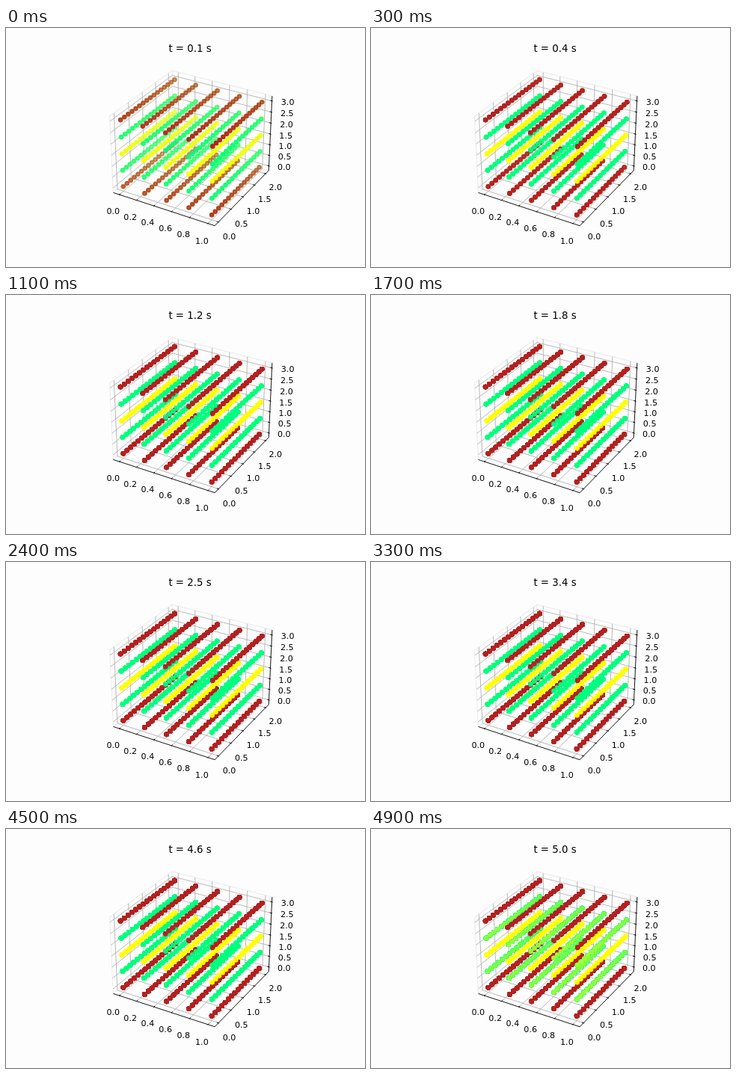
Write an HTML page with a canvas that moves like this. It is 480 px wide and 320 px high and loops after 5000 ms.

```html
<!DOCTYPE html>
<html lang="en">
<head>
<meta charset="utf-8">
<title>Scatter over time</title>
<style>
  html, body { margin: 0; width: 100%; height: 100%; overflow: hidden; background: #fdfdfd; }
  svg, canvas { position: absolute; left: 0; top: 0; width: 480px; height: 320px; display: block; }
  text { font-family: "DejaVu Sans", Verdana, sans-serif; font-size: 11.11px; text-anchor: middle; fill: #000; }
  #title { font-size: 13.33px; }
  path { fill: none; stroke-width: 0.89; }
  .pane { stroke: #ececec; stroke-width: 1.1; }
  .grid { stroke: #b0b0b0; }
  .axis { stroke: #000; }
</style>
</head>
<body>
<svg id="plot" viewBox="0 0 480 320" width="480" height="320">
  <text id="title" x="246" y="32"></text>
</svg>
<canvas id="dots" width="480" height="320"></canvas>
<script>
const LOOP = 5000, STEP = 100, STEPS = LOOP / STEP;
const MAX = [1, 2, 3];            // data range of each axis, from 0
const BOX = [8 / 7, 8 / 7, 6 / 7]; // box proportions
const EDGE = 0.5 + 1 / 48;        // panes reach a little past the limits
const LABEL = EDGE + 0.1058;
const SCALE = 241.6 / 0.185, CX = 249.27, CY = 155.94, DIST = 10;

const RIGHT = [Math.sqrt(3) / 2, 0.5, 0];
const UP = [-0.25, Math.sqrt(3) / 4, Math.sqrt(3) / 2];
const NEAR = [Math.sqrt(3) / 4, -0.75, 0.5];

const dot = (a, b) => a[0] * b[0] + a[1] * b[1] + a[2] * b[2];
const unit = (axis, value) => (value / MAX[axis] - 0.5) / 1.1;

// Box coordinates (-0.5 to 0.5) to the stage
function project(u) {
  const p = u.map((c, i) => c * BOX[i]);
  const near = dot(p, NEAR), k = SCALE / (DIST - near);
  return { x: CX + dot(p, RIGHT) * k, y: CY - dot(p, UP) * k, near };
}

const plot = document.getElementById('plot');
const title = document.getElementById('title');

function add(tag, attrs) {
  const node = document.createElementNS('http://www.w3.org/2000/svg', tag);
  for (const key in attrs) node.setAttribute(key, attrs[key]);
  plot.appendChild(node);
  return node;
}

function line(cls, ...points) {
  const d = points.map(project).map(p => p.x.toFixed(2) + ' ' + p.y.toFixed(2)).join('L');
  add('path', { class: cls, d: 'M' + d });
}

function label(value, u) {
  const p = project(u);
  add('text', { x: p.x.toFixed(2), y: Math.round(p.y + 8.44) }).textContent = value.toFixed(1);
}

function drawAxes() {
  const E = EDGE, L = LABEL;
  const inner = E - 0.2 / 12, outer = E + 0.1 / 12;
  const ticks = (axis, step, draw) => {
    for (let v = 0; v < MAX[axis] + 0.01; v += step) draw(unit(axis, v), v);
  };

  line('pane', [-E, -E, -E], [-E, E, -E], [-E, E, E], [-E, -E, E], [-E, -E, -E]);
  line('pane', [-E, E, -E], [E, E, -E], [E, E, E], [-E, E, E]);
  line('pane', [-E, -E, -E], [E, -E, -E], [E, E, -E]);

  ticks(0, 0.2, x => line('grid', [x, -E, -E], [x, E, -E], [x, E, E]));
  ticks(1, 0.5, y => line('grid', [E, y, -E], [-E, y, -E], [-E, y, E]));
  ticks(2, 0.5, z => line('grid', [-E, -E, z], [-E, E, z], [E, E, z]));

  line('axis', [-E, -E, -E], [E, -E, -E]);
  line('axis', [E, -E, -E], [E, E, -E]);
  line('axis', [E, E, -E], [E, E, E]);

  ticks(0, 0.2, (x, v) => {
    line('axis', [x, -inner, -E], [x, -outer, -E]);
    label(v, [x, -L, -L]);
  });
  ticks(1, 0.5, (y, v) => {
    line('axis', [inner, y, -E], [outer, y, -E]);
    label(v, [L, y, -L]);
  });
  ticks(2, 0.5, (z, v) => {
    line('axis', [inner, E, z], [outer, E, z]);
    label(v, [L, L, z]);
  });
}

// Grid of samples, far ones first, fading with depth
const NX = 5, NY = 16, NZ = 5;
function makeDots() {
  const list = [];
  const at = (i, n) => (i / (n - 1) - 0.5) / 1.1;
  for (let i = 0; i < NX; i++)
    for (let j = 0; j < NY; j++)
      for (let k = 0; k < NZ; k++)
        list.push({ level: k, ...project([at(i, NX), at(j, NY), at(k, NZ)]) });
  list.sort((a, b) => a.near - b.near);
  const far = list[0].near, span = list[list.length - 1].near - far;
  for (const d of list) d.alpha = 0.3 + 0.7 * (d.near - far) / span;
  return list;
}

const RED = '#b22222', GREEN = '#00ff7f', LIME = '#adff2f', YELLOW = '#ffff00';

// Layer 0 is the uniform start; each later layer is one time step
function colour(level, layer) {
  if (layer === 0) return LIME;
  if (level === 0 || level === NZ - 1) return RED;
  if (level === 2) return YELLOW;
  return layer === STEPS ? LIME : GREEN;
}

const ctx = document.getElementById('dots').getContext('2d');
const dots = makeDots();
ctx.lineWidth = 1.667;

function drawLayer(layer) {
  for (const d of dots) {
    ctx.globalAlpha = d.alpha;
    ctx.fillStyle = ctx.strokeStyle = colour(d.level, layer);
    ctx.beginPath();
    ctx.arc(d.x, d.y, 2.485, 0, 2 * Math.PI);
    ctx.fill();
    ctx.stroke();
  }
}

// Layers pile up, so only the missing ones are painted
let painted = -1;
function show(time) {
  const last = Math.floor((time % LOOP) / STEP) + 1;
  if (last === painted) return;
  if (last < painted) {
    ctx.clearRect(0, 0, 480, 320);
    painted = -1;
  }
  while (painted < last) drawLayer(++painted);
  title.textContent = 't = ' + (last / 10).toFixed(1) + ' s';
}

drawAxes();
show(0);
const start = performance.now();
function tick() {
  show(Math.max(0, performance.now() - start));
  requestAnimationFrame(tick);
}
requestAnimationFrame(tick);
</script>
</body>
</html>
```
